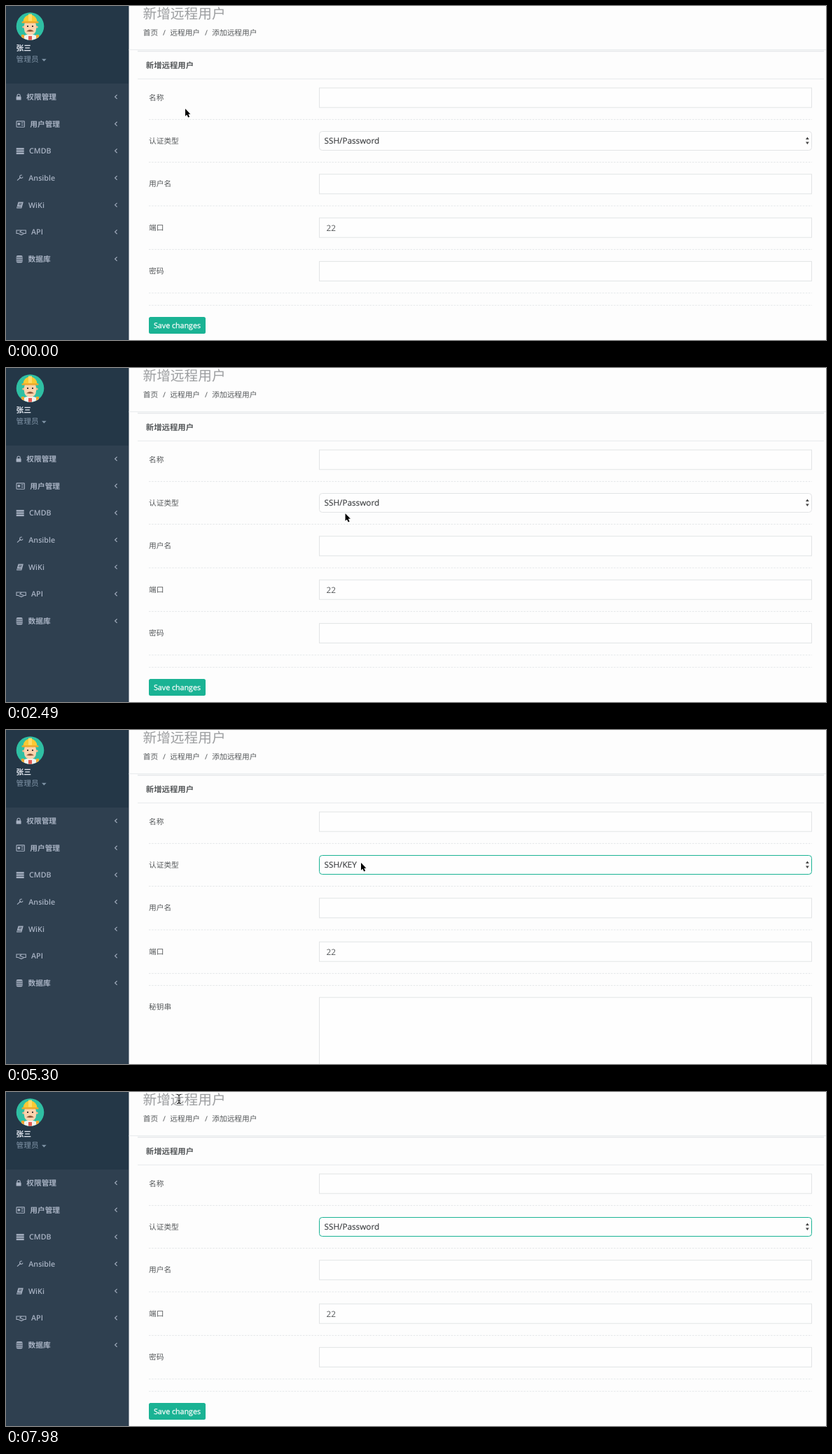
These frames come from a looping animation (1171 px wide and 478 px high, 8 s). An HTML page:

```html
<!DOCTYPE html>
<html lang="zh-CN">
<head>
<meta charset="utf-8">
<title>新增远程用户</title>
<style>
  html, body { margin: 0; width: 100%; height: 100%; overflow: hidden; background: #fdfdfd; }
  svg { display: block; width: 1171px; height: 478px; }
  text { font: 10.7px "Open Sans", "Noto Sans CJK SC", "Noto Sans CJK", sans-serif; fill: #55585a; white-space: pre; text-rendering: geometricPrecision; }
  .title { font-size: 19.7px; font-weight: 100; fill: #9c9ea0; }
  .bold { font-size: 11.4px; font-weight: 700; }
  .value { font-size: 11.75px; }
  #choice { fill: #3c3e40; stroke: #3c3e40; stroke-width: .15; }
  .name { font-size: 10.8px; fill: #dfe4ed; }
  .role { fill: #8095a8; }
  .save { fill: #fff; stroke: #fff; stroke-width: .25; text-anchor: middle; }
  .menu { font-weight: 600; fill: #a7b1c2; }
  .field { fill: #fefefe; stroke: #e2e4e5; }
  .focus { stroke: #1ab394; }
  .rule { stroke: #dfe3e5; stroke-width: .85; stroke-dasharray: 2.5 1.65; }
  .edge { stroke: #e7eaec; }
  .icon { fill: #a7b1c2; }
  .line { fill: none; stroke: #a7b1c2; stroke-width: 1.1; }
  .gap { fill: none; stroke: #2f4050; stroke-width: .9; }
  .popup text { font: 11.2px Inter, Roboto, sans-serif; fill: #222; }
  .popup .chosen { fill: #fff; }
  .popup > rect:first-child { filter: drop-shadow(0 3px 4px rgba(0, 0, 0, .3)); }
</style>
</head>
<body>
<svg viewBox="0 0 1171 478">
  <defs><clipPath id="disc"><circle cx="34.5" cy="29" r="19.8"/></clipPath></defs>
  <g id="page">
    <rect width="175.5" height="500" fill="#2f4050"/>
    <rect width="175" height="111" fill="#243747"/>
    <g clip-path="url(#disc)">
      <rect x="14" y="8" width="41" height="42" fill="#2fbfa3"/>
      <ellipse cx="34.5" cy="50" rx="15" ry="9.5" fill="#f1f1ee"/>
      <path d="M24 41V50M45 41V50" stroke="#f2a531" stroke-width="4"/>
      <path d="M32 43H37V50H32Z" fill="#e4574f"/>
      <ellipse cx="34.5" cy="30" rx="11.5" ry="3" fill="#efb98f"/>
      <rect x="26" y="20" width="17" height="21.5" rx="8" fill="#fbd3ae"/>
      <path d="M29 36.3Q34.5 31 40 36.3Q34.5 37 29 36.3Z" fill="#8a5637"/>
      <path d="M30 29H32M37 29H39" stroke="#443a36" stroke-width="1.8"/>
      <path d="M24.5 23A10 10.5 0 0 1 44.5 23Z" fill="#fac934"/>
      <rect x="32" y="11.5" width="5" height="10" fill="#ffdc69"/>
      <rect x="22.5" y="22" width="24" height="2.6" rx="1.2" fill="#eea92d"/>
    </g>
    <text class="bold name" x="14.5" y="64.3">张三</text>
    <text class="role" x="14.5" y="80.2">管理员</text>
    <path d="M51 75.7H57.6L54.3 79.2Z" fill="#8095a8"/>
    <g id="menu"></g>

    <text class="title" x="195.5" y="18.4">新增远程用户</text>
    <text x="195.8" y="42">首页</text><text x="224" y="42">/</text>
    <text x="234.3" y="42">远程用户</text><text x="284" y="42">/</text>
    <text x="294.3" y="42">添加远程用户</text>
    <path class="edge" d="M175.5 62.7H1171M188 104.3H1168"/>
    <path class="edge" d="M188 64.6H1168" stroke-width="1.8"/>
    <text class="bold" x="199.8" y="89">新增远程用户</text>
    <g id="form"></g>
    <text id="choice" class="value" x="454.5" y="196.7"></text>
    <path d="M1142 191L1144.4 187.6L1146.8 191ZM1142 194.6L1144.4 198L1146.8 194.6Z" fill="#444"/>
    <g id="popup" class="popup">
      <rect x="438.5" y="181.3" width="704.5" height="38.6" rx="4.5" fill="#f0f0f0"/>
      <rect id="bar" x="438.5" width="704.5" height="16" fill="#4297fd"/>
      <text class="item" x="456" y="196.6">SSH/Password</text>
      <text class="item" x="456" y="212.5">SSH/KEY</text>
      <path id="check" d="M443.7 192.8L446 195.8L450.2 188.8" fill="none" stroke-width="1.4"/>
    </g>
  </g>
  <path id="arrow" d="M1 1V11.7L3.3 9.5L5.2 13.4L7.1 12.5L5.3 8.7H8.4Z" stroke="#fff" paint-order="stroke"/>
  <g id="beam" fill="none">
    <path id="stem" d="M-3 -6.5Q0 -6.5 0 -4.5V4.5Q0 6.5 3 6.5M3 -6.5Q0 -6.5 0 -4.5V4.5Q0 6.5 -3 6.5M-1.5 2.5H1.5" stroke="#111" stroke-width="1.1"/>
  </g>
</svg>
<script>
const $ = id => document.getElementById(id);

// Icons are drawn around y = 0 of their menu row.
const menu = [
  ["权限管理", 29.3, `<rect class="icon" x="14.6" y="-.8" width="7" height="5.2" rx=".7"/><path class="line" d="M16 0V-2A2.1 2 0 0 1 20.2 -2V0"/>`],
  ["用户管理", 34.3, `<rect class="line" x="15" y="-4" width="11.4" height="8.4" rx=".8"/><circle class="icon" cx="18.4" cy="0" r="1.9"/><path class="line" d="M21.6 -1.6H25M21.6 1.4H25"/>`],
  ["CMDB", 33, `<rect class="icon" x="14.7" y="-4.4" width="11" height="9"/><path class="gap" d="M14 -1.5H26M14 1.7H26"/>`],
  ["Ansible", 32.3, `<path class="line" d="M16 3.5L21 -1.2" stroke-width="2.6"/><path class="line" d="M22.8 -4A2.2 2.2 0 1 0 24 -1.5" stroke-width="1.8"/>`],
  ["WiKi", 32, `<path class="icon" d="M17.5 -4.4H24.8L22.3 4.6H15Z"/><path class="gap" d="M18.5 -2.2H22.7M18 -.3H22M16 2.9H21.5"/>`],
  ["API", 36, `<path class="line" d="M15 -2.6H28.3V2H26L22 4L17.4 2H15ZM22 -2.6L20 0L26 2"/>`],
  ["数据库", 31.5, `<rect class="icon" x="14.7" y="-5.2" width="9" height="10.4" rx="2.2"/><path class="gap" d="M14.7 -2.4H23.7M14.7 .2H23.7M14.7 2.8H23.7"/>`]
];
$("menu").innerHTML = menu.map(([text, x, icon], i) =>
  `<g transform="translate(0 ${130.2 + i * 38.67})">${icon}
   <text class="menu" x="${x}" y="3.9">${text}</text>
   <path class="line" d="M158.6 -3.1L155.6 -.2L158.6 2.7"/></g>`).join("");

const rule = y => `<path class="rule" d="M204 ${y}H1151"/>`;
const row = (label, y, height = 28, extra = "") =>
  `<text x="204" y="${y + 17.3}">${label}</text>
   <rect class="field" x="447.5" y="${y}" width="703" height="${height}" ${extra}/>`;

let y = 117.2, form = "";
for (const label of ["名称", "认证类型", "用户名", "端口"]) {
  const isSelect = label === "认证类型";
  form += isSelect ? row(label, 179.5, 27, 'id="select" rx="4"') : row(label, y);
  y += isSelect ? 61.2 : 62.4;
  form += rule(y - 17.2);
}
$("form").innerHTML = form + `
  <text class="value" x="457.6" y="321.6">22</text>
  <g id="password">${row("密码", y)}${rule(y + 45.2)}${rule(y + 62.7)}
    <rect x="204" y="445" width="81" height="24" rx="2.5" fill="#1ab394"/>
    <text class="save" x="244.5" y="460.8">Save changes</text></g>
  <g id="key">${rule(y)}${row("秘钥串", y + 17.2, 150)}</g>`;

const halo = $("stem").cloneNode();
halo.removeAttribute("id");
halo.setAttribute("stroke", "#fff");
halo.setAttribute("stroke-width", 2.4);
$("beam").prepend(halo);

// Pointer key points: time, x, y.
const path = [
  [20, 255, 146], [200, 262, 137], [770, 557, 341], [1370, 445, 303], [1820, 445, 303],
  [2570, 488, 196], [3170, 497, 214], [3970, 497, 214], [4520, 492, 419], [4820, 463, 418],
  [4980, 463, 418], [5270, 506, 189], [6020, 505, 188], [6170, 503, 176], [6470, 503, 176],
  [6770, 500, 421], [7520, 309, 203], [7970, 247, 10]
];
const LOOP = 8000, STEP = 150, OFFSET = 20;
const ease = p => p * p * (3 - 2 * p);

function pointer(t) {
  const next = path.findIndex(([at]) => at > t);
  if (next === 0) return path[0].slice(1);
  if (next < 0) return path.at(-1).slice(1);
  const [t0, x0, y0] = path[next - 1], [t1, x1, y1] = path[next];
  const p = ease((t - t0) / (t1 - t0));
  return [x0 + (x1 - x0) * p, y0 + (y1 - y0) * p];
}

const show = (id, on) => $(id).style.display = on ? "" : "none";
const move = (id, x, y) => $(id).setAttribute("transform", `translate(${x} ${y})`);
const items = document.querySelectorAll(".item");

function draw(t) {
  const during = (from, to) => t >= from && t < to;
  const mode = during(3910, 6460) ? 1 : 0;
  const open = during(2710, 3910) || during(5710, 6460);
  const hot = during(3010, 3760) ? 1 : during(6160, 6460) ? 0 : -1;
  const beam = during(4360, 5100) || t >= 7960;
  // The page is pulled up, held, and springs back.
  const pull = during(1200, 2100) ? Math.min(1, 1.6 * Math.sin(Math.PI * (t - 1200) / 900)) : 0;

  move("page", 0, -7.5 * pull);
  show("password", !mode);
  show("key", mode);
  $("choice").textContent = items[mode].textContent;
  $("select").classList.toggle("focus", t >= 2560);

  show("popup", open);
  move("popup", 0, -16 * mode);
  move("check", 0, 16 * mode);
  $("check").setAttribute("stroke", hot === mode ? "#fff" : "#222");
  show("bar", hot >= 0);
  $("bar").setAttribute("y", 184.6 + 16 * hot);
  items.forEach((item, i) => item.classList.toggle("chosen", i === hot));

  show("arrow", !beam);
  show("beam", beam);
  move(beam ? "beam" : "arrow", ...pointer(t));
}

// The screen refreshes in even steps.
function tick() {
  const t = performance.now() % LOOP;
  draw(Math.floor((t - OFFSET) / STEP) * STEP + OFFSET);
  requestAnimationFrame(tick);
}
tick();
</script>
</body>
</html>
```
